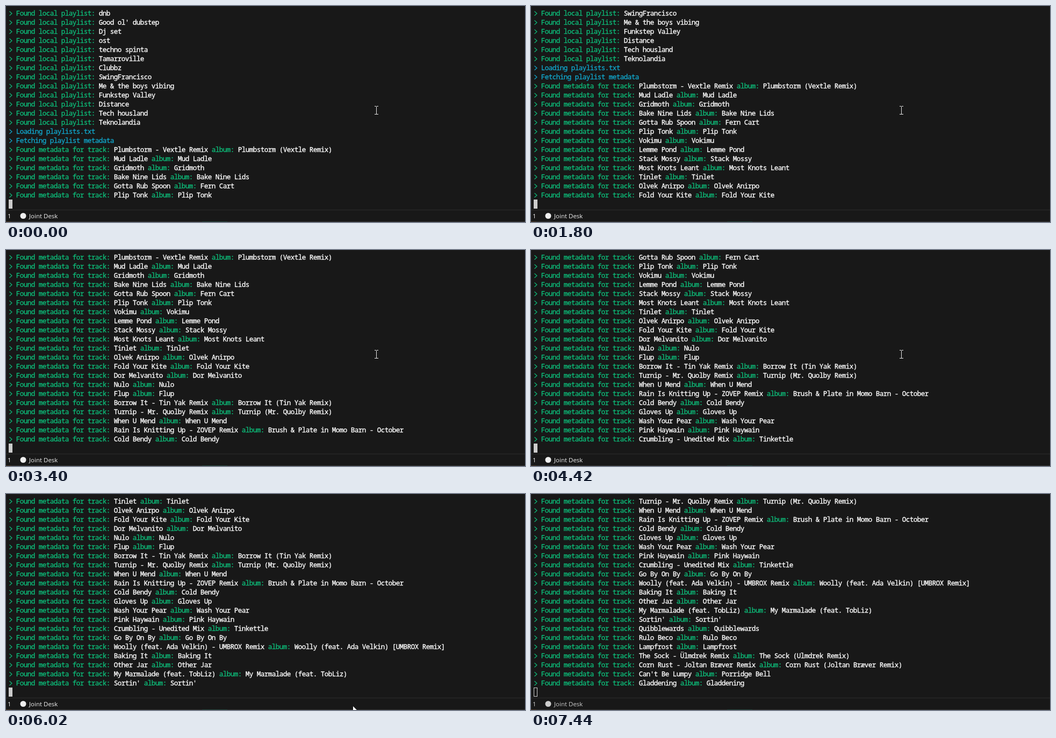
Animation of 966x404 px, one loop 7640 ms. Source, as an HTML page with a canvas:

```html
<!DOCTYPE html>
<html lang="en">
<head>
<meta charset="utf-8">
<title>Terminal log</title>
<style>
  html, body { margin: 0; width: 100%; height: 100%; overflow: hidden; background: #181818; }
  canvas { display: block; }
</style>
</head>
<body>
<canvas id="stage" width="966" height="404"></canvas>
<script>
const ctx = document.getElementById('stage').getContext('2d');

const LOOP = 7640, ROWS = 21;
const CELL = { x: 5, w: 7, h: 17, baseline: 18 };
const GREEN = '#0dbc79', CYAN = '#11a8cd', WHITE = '#ffffff';

const playlists = [
  'dnb', "Good ol' dubstep", 'Dj set', 'ost', 'techno spinta', 'Tamarroville', 'Clubbz',
  'SwingFrancisco', 'Me & the boys vibing', 'Funkstep Valley', 'Distance', 'Tech housland', 'Teknolandia'
];

// "title|album"; without an album the title is used for both.
const tracks = [
  'Plumbstorm - Vextle Remix|Plumbstorm (Vextle Remix)',
  'Mud Ladle', 'Gridmoth', 'Bake Nine Lids', 'Gotta Rub Spoon|Fern Cart', 'Plip Tonk',
  'Vokimu', 'Lemme Pond', 'Stack Mossy', 'Most Knots Leant', 'Tinlet', 'Olvek Anirpo',
  'Fold Your Kite', 'Dor Melvanito', 'Nulo', 'Flup',
  'Borrow It - Tin Yak Remix|Borrow It (Tin Yak Remix)',
  'Turnip - Mr. Quolby Remix|Turnip (Mr. Quolby Remix)',
  'When U Mend',
  'Rain Is Knitting Up - ZOVEP Remix|Brush & Plate in Momo Barn - October',
  'Cold Bendy', 'Gloves Up', 'Wash Your Pear', 'Pink Haywain',
  'Crumbling - Unedited Mix|Tinkettle',
  'Go By On By',
  'Woolly (feat. Ada Velkin) - UMBROX Remix|Woolly (feat. Ada Velkin) [UMBROX Remix]',
  'Baking It', 'Other Jar', 'My Marmalade (feat. TobLiz)', "Sortin'", 'Quibblewards',
  'Rulo Beco', 'Lampfrost',
  'The Sock - Ülmdrek Remix|The Sock (Ulmdrek Remix)',
  'Corn Rust - Joltan Bræver Remix|Corn Rust (Joltan Bræver Remix)',
  "Can't Be Lumpy|Porridge Bell", 'Gladdening'
];

// Each log line is a list of [text, colour] runs, printed after the prompt chevron.
const lines = [
  ...playlists.map(name => [['Found local playlist: ', GREEN], [name, WHITE]]),
  [['Loading playlists.txt', CYAN]],
  [['Fetching playlist metadata', CYAN]],
  ...tracks.map(entry => {
    const [title, album = title] = entry.split('|');
    return [['Found metadata for track: ', GREEN], [title, WHITE], [' album: ', GREEN], [album, WHITE]];
  })
];

// Moments at which the log scrolls by one line.
const scrollTimes = [
  400, 600, 800, 1000, 1200, 1400, 1800, 2000, 2200, 2400, 2600, 2800,
  3200, 3200, 3400, 3600, 3820, 4020, 4420, 4820, 5020, 5220, 5420, 5620, 5820,
  6220, 6420, 6620, 6820, 7020, 7220, 7440
];
const BLUR_TIME = 7220;

function rect(color, x, y, w, h) {
  ctx.fillStyle = color;
  ctx.fillRect(x, y, w, h);
}

function drawChevron(color, baseline) {
  ctx.strokeStyle = color;
  ctx.lineWidth = 1.2;
  ctx.stroke(new Path2D(`M6.5 ${baseline - 8}l4.5 4l-4.5 4`));
}

function drawLine(runs, row) {
  const baseline = CELL.baseline + row * CELL.h;
  drawChevron(runs[0][1], baseline);
  ctx.lineWidth = 0.35;
  let column = 2;
  for (const [text, color] of runs) {
    ctx.fillStyle = ctx.strokeStyle = color;
    for (const char of text) {
      const x = CELL.x + (column++ + 0.5) * CELL.w;
      ctx.fillText(char, x, baseline);
      ctx.strokeText(char, x, baseline); // slightly heavier than regular
    }
  }
}

function drawLog(t) {
  const top = scrollTimes.filter(time => time <= t).length;
  ctx.font = '12.5px "Noto Sans Mono", monospace';
  ctx.textAlign = 'center';
  lines.slice(top, top + ROWS).forEach(drawLine);
}

function drawCaret(focused) {
  const y = 5 + ROWS * CELL.h;
  rect('#cccccc', CELL.x, y, CELL.w, CELL.h);
  if (!focused) rect('#181818', CELL.x + 1, y + 1, CELL.w - 2, CELL.h - 2);
}

function drawStatusBar(focused) {
  rect('#2b2b2b', 0, 381, 966, 1);
  rect('#333333', 0, 403, 966, 1);
  rect('#4d3a2a', 0, 403, 10, 1);
  rect('#2a4a44', 365, 403, 47, 1);
  ctx.font = '11.5px "Open Sans", sans-serif';
  ctx.textAlign = 'left';
  ctx.fillStyle = focused ? '#f0f0f0' : '#cccccc';
  ctx.fillText('1', 3, 397);
  ctx.fillText('Joint Desk', 43, 397);
  ctx.beginPath();
  ctx.arc(32, 392.5, 5.5, 0, Math.PI * 2);
  ctx.fill();
}

function drawTextPointer(x, y) {
  rect('#e8e8e8', x, y - 7, 1, 15);
  for (const edge of [y - 8, y + 7]) {
    rect('#e8e8e8', x - 3, edge, 3, 1);
    rect('#e8e8e8', x + 1, edge, 3, 1);
  }
}

function drawArrow(x, y) {
  ctx.fillStyle = '#ffffff';
  ctx.fill(new Path2D(`M${x} ${y}v16l4-4 3 6 2-1-3-6h5z`));
}

function drawPointer(t) {
  if (t < 5820) drawTextPointer(689, 195);
  else if (t < 6020) drawTextPointer(667, 369);
  else if (t < 6220) drawArrow(646, 397);
}

function frame(now) {
  const t = now % LOOP;
  const focused = t < BLUR_TIME;
  rect('#181818', 0, 0, 966, 404);
  drawLog(t);
  drawCaret(focused);
  drawStatusBar(focused);
  drawPointer(t);
  requestAnimationFrame(frame);
}
requestAnimationFrame(frame);
</script>
</body>
</html>
```
